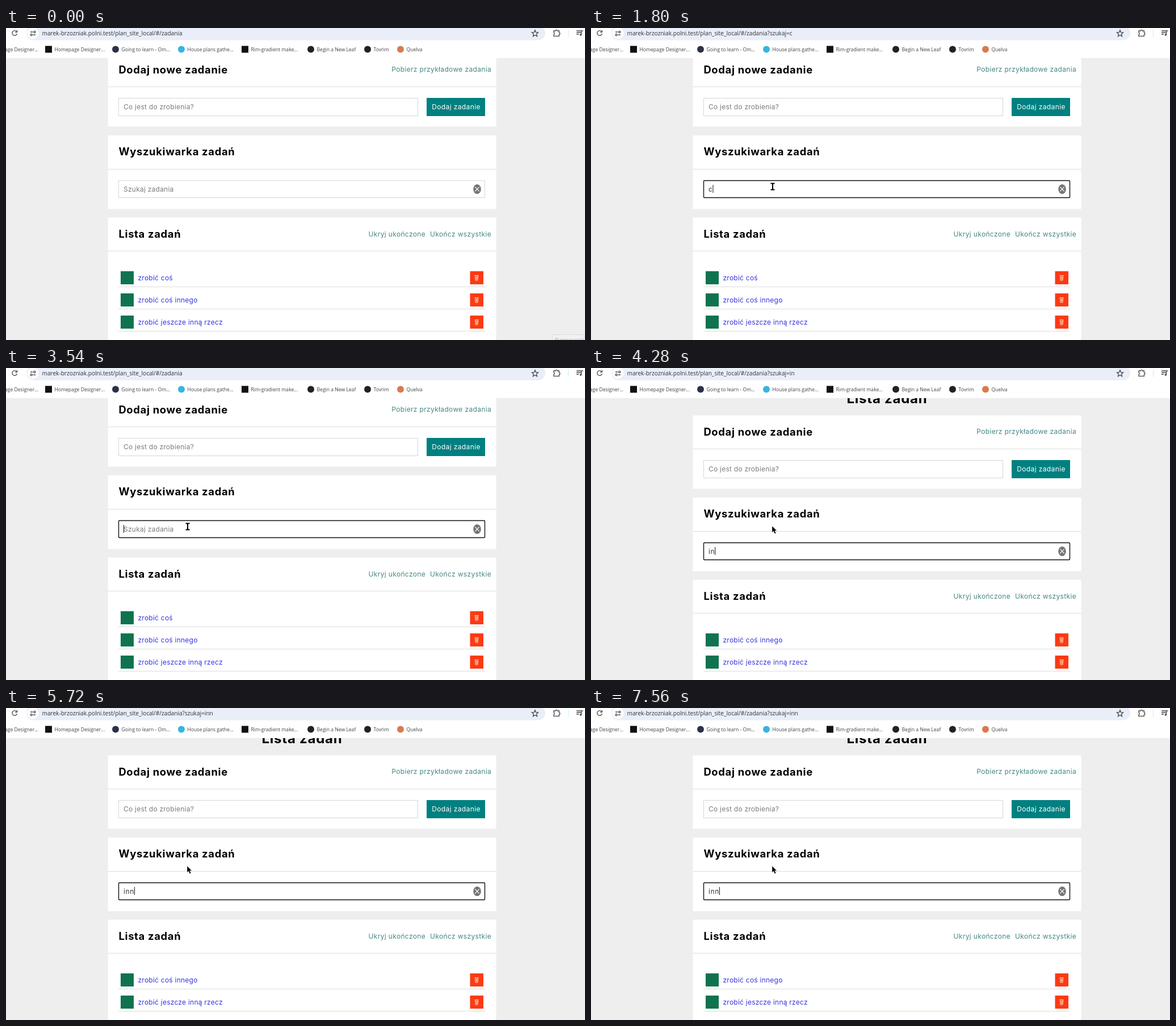
An HTML page that plays this animation: 1020x549 px, repeating every 8000 ms.

```html
<!DOCTYPE html>
<html lang="pl">
<head>
<meta charset="utf-8">
<title>Lista zadań</title>
<style>
  html, body { margin: 0; width: 100%; height: 100%; overflow: hidden; background: #eee; }
  svg { display: block; width: 1020px; height: 549px; }
  text { font: 12px Inter, sans-serif; letter-spacing: .24px; white-space: pre; }
  .h1 { font-size: 24px; font-weight: 700; letter-spacing: .75px; }
  .h2 { font-size: 18.4px; font-weight: 700; letter-spacing: .68px; }
  .link { fill: #458784; letter-spacing: .34px; }
  .hint { fill: #7c7c7c; }
  .task { fill: #3434e0; letter-spacing: .24px; }
  #typed { fill: #333; letter-spacing: .6px; }
  .line { stroke: #ddd; fill: none; }
  .field { stroke: #d6d6d6; fill: #fff; }
  #bar text { font: 8.6px "Open Sans", sans-serif; fill: #444; letter-spacing: 0; }
  #bar #url { font-size: 10.1px; fill: #303236; }
  .icon { fill: none; stroke: #474747; stroke-width: 1.3; }
</style>
</head>
<body>
<svg viewBox="0 0 1020 549">
  <rect width="1020" height="549" fill="#eee"/>

  <g id="page">
    <rect y="-45" width="1020" height="29" fill="#008080"/>
    <text class="h1" x="521.5" y="23" text-anchor="middle">Lista zadań</text>
    <path fill="#fff" d="M179.5 44.5h684v129h-684zM179.5 189h684v129.5h-684zM179.5 333.5h684v300h-684z"/>
    <path class="line" d="M179.5 103.5h684M179.5 248.5h684M179.5 392.5h684"/>

    <text class="h2" x="198.4" y="79.5">Dodaj nowe zadanie</text>
    <text class="link" x="855" y="77" text-anchor="end">Pobierz przykładowe zadania</text>
    <rect class="field" x="198.5" y="123.5" width="527" height="31"/>
    <text class="hint" x="207" y="143">Co jest do zrobienia?</text>
    <rect x="741" y="123" width="103" height="32" fill="#008080"/>
    <text x="793" y="143" text-anchor="middle" fill="#fff" style="letter-spacing:.39px">Dodaj zadanie</text>

    <text class="h2" x="198.4" y="224">Wyszukiwarka zadań</text>
    <rect class="field" x="198.5" y="268.5" width="645" height="30"/>
    <rect id="ring" x="198.5" y="268.5" width="645" height="30" rx="1.5" fill="#fff" stroke="#101010" stroke-width="1.4"/>
    <text id="hint" class="hint" x="207" y="287.5">Szukaj zadania</text>
    <text id="typed" x="207" y="287.5"></text>
    <rect id="caret" y="276" width="1" height="14" fill="#111"/>
    <ellipse cx="830" cy="283.5" rx="6.8" ry="8.6" fill="#757575"/>
    <path d="M826.3 279.6l7.4 7.8m0-7.8l-7.4 7.8" stroke="#fff" stroke-width="1.2"/>

    <text class="h2" x="198.4" y="369">Lista zadań</text>
    <text class="link" x="739" y="367" text-anchor="end">Ukryj ukończone</text>
    <text class="link" x="855" y="367" text-anchor="end">Ukończ wszystkie</text>
    <g id="list"></g>
  </g>

  <g id="tip">
    <rect x="962.5" y="539.5" width="56" height="14" fill="#f1f1f1" stroke="#dcdcdc"/>
    <text x="967" y="552" fill="#aaa" style="font-size:9px;letter-spacing:0">Nagrywanie</text>
  </g>

  <g id="bar">
    <rect width="1020" height="53" fill="#fff"/>
    <rect x="36" y="-4" width="914" height="25.5" rx="12.7" fill="#e9eef8"/>
    <circle cx="47.5" cy="9" r="10" fill="#fff"/>
    <path class="icon" d="M18.6 6.2A4.3 4.3 0 1 0 19.4 10M19.5 4v3.4h-3.4"/>
    <path class="icon" d="M43 7h4.2M47.8 12H52"/>
    <circle class="icon" cx="50.3" cy="7" r="1.6"/>
    <circle class="icon" cx="44.7" cy="12" r="1.6"/>
    <path class="icon" d="M932 3.8l1.6 3.8 4 .3-3 2.7.9 4-3.5-2.1-3.5 2.1.9-4-3-2.7 4-.3z"/>
    <path class="icon" d="M965 5h3.2a1.6 1.6 0 0 1 3.2 0h3v3.2a1.6 1.6 0 0 1 0 3.2v3h-9.4v-3a1.7 1.7 0 0 0 0-3.3z"/>
    <path d="M990.5 3v13" stroke="#c9ecf7"/>
    <path class="icon" d="M1005 5h8M1005 8h8M1005 11h4M1013.6 12V5h3"/>
    <circle cx="1012.3" cy="12" r="1.7" fill="#474747"/>
    <text id="url" x="63.5" y="13.2"></text>
    <text x="57" y="41" text-anchor="end">Homepage Designer...</text>
  </g>

  <path id="arrow" d="M0 0v11.5l2.6-2.4 2 4.4 2.2-1-2-4.2h3.5z" stroke="#fff" stroke-width=".4"/>
  <path id="beam" d="M-3.5-5.5h7M-3.5 5.5h7M0-5.5v11" fill="none" stroke="#000" stroke-width="2"/>
</svg>

<script>
const LOOP = 8000, ROW = 39, CLICK = 1050;
const ADDRESS = 'marek-brzozniak.polni.test/plan_site_local/#/zadania';
const TASKS = ['zrobić coś', 'zrobić coś innego', 'zrobić jeszcze inną rzecz'];

// start time, search text, caret visible
const STATES = [
  [0, '', 0], [CLICK, '', 1], [1550, '', 0], [1800, 'c', 1], [2130, 'co', 1],
  [2460, 'coś', 1], [2970, 'coś', 0], [3130, 'co', 0], [3380, 'c', 1], [3460, '', 1],
  [3950, '', 0], [4030, 'i', 1], [4280, 'in', 1], [4450, 'inn', 1], [5050, 'inn', 0],
  [5130, 'inne', 1], [5720, 'inn', 1], [6220, 'inn', 0], [6470, 'inną', 1],
  [6980, 'inną', 0], [7560, 'inn', 1]
];

// icon centre, colour, round, label
const BOOKMARKS = [
  [75, '#111', 0, 'Homepage Designer...'], [193, '#2c3148', 1, 'Going to learn - Om...'],
  [309, '#36b5e0', 1, 'House plans gathe...'], [421, '#111', 0, 'Rim-gradient make...'],
  [537, '#222', 1, 'Begin a New Leaf'], [637, '#222', 1, 'Tovrim'], [695, '#d97a4e', 1, 'Quelva']
];

const $ = id => document.getElementById(id);
const show = (id, on) => $(id).setAttribute('visibility', on ? 'visible' : 'hidden');
const move = (id, x, y) => $(id).setAttribute('transform', `translate(${x} ${y})`);
const matches = text => TASKS.filter(name => name.includes(text));
const pageShift = text => (TASKS.length - matches(text).length) * ROW;

$('bar').innerHTML += BOOKMARKS.map(([x, color, round, label]) => `
  <rect x="${x - 6}" y="31.5" width="12" height="12" rx="${round ? 6 : 0}" fill="${color}"/>
  <text x="${x + 10.5}" y="41">${label}</text>`).join('');

const taskRow = (name, i) => `<g transform="translate(0 ${i * ROW})">
  <rect x="202" y="428" width="23" height="23" fill="#10734f"/>
  <text class="task" x="232.5" y="444">${name}</text>
  <rect x="817.5" y="428" width="23.5" height="23" fill="#fc3a14"/>
  <path d="M825.5 435.5h7M826.5 436l.5 8h4l.5-8M828.5 437v5.5M830 437v5.5" fill="none" stroke="#ffd9b8"/>
  <path class="line" d="M198 455.5h646"/></g>`;

function pointer(t) {
  const glide = (start, step, count, x0, y0, x1, y1) => {
    const k = Math.min(1, Math.floor((t - start) / step) / count);
    const e = 1 - (1 - k) ** 2;
    return [x0 + (x1 - x0) * e, y0 + (y1 - y0) * e];
  };
  return t < 710 ? glide(80, 76.6, 6, 975, 538, 339, 297)
                 : glide(625, 85, 5, 339, 297, 320, 279);
}

let last;
function drawState(state) {
  if (state === last) return;
  last = state;
  const [start, text, caret] = state;
  $('url').textContent = ADDRESS + (text && '?szukaj=' + text);
  $('typed').textContent = text;
  $('list').innerHTML = matches(text).map(taskRow).join('');
  $('caret').setAttribute('x', 207 + (text ? $('typed').getComputedTextLength() : 0));
  move('page', 0, pageShift(text));
  show('hint', !text);
  show('caret', caret);
  show('ring', start >= CLICK);
}

function draw() {
  const t = performance.now() % LOOP;
  const state = STATES.findLast(s => s[0] <= t);
  drawState(state);

  const [x, y] = pointer(t);
  const shift = pageShift(state[1]);
  const overField = x > 198 && x < 844 && y > 268 + shift && y < 299 + shift;
  move('arrow', x - 1, y - 1);
  move('beam', x, y);
  show('arrow', t >= 80 && !overField);
  show('beam', t >= 80 && overField);
  show('tip', t < 80);
  requestAnimationFrame(draw);
}
draw();
</script>
</body>
</html>
```
